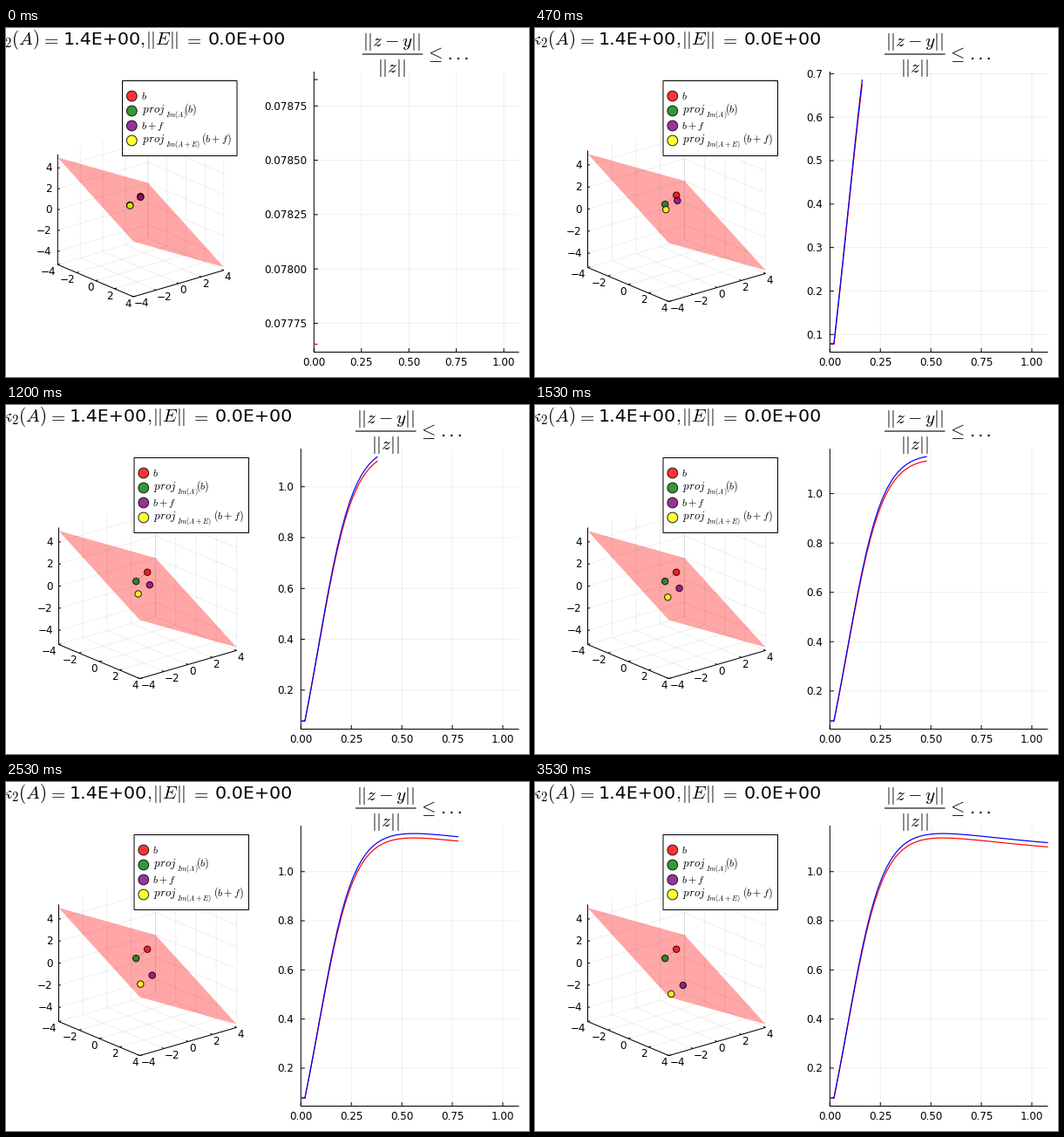
A matplotlib script that plays this animation: 600 by 400 pixels, repeating every 3590 ms.

```python
import math
import numpy as np
import matplotlib.pyplot as plt
from matplotlib.animation import FuncAnimation
from matplotlib.patches import Circle, Polygon, Rectangle

W, H, DPI = 600, 400, 100
LOOP_MS, TICKS = 3590, 180
# Fifteen steps a second, each start rounded to 10 ms.
STARTS = 10 * np.round(np.arange(54) * 20 / 3)
PX = 72 / DPI  # points per pixel
SMALL, BIG, NUMBER = 12, 21, 20.5
TOP, BOTTOM, RIGHT = 50, 371.5, 588.5
X_MAX = 1.08
STEPS = [(0.2, 1), (0.1, 1), (0.05, 2), (0.02, 2), (0.00025, 5)]
RED, GREEN, PURPLE, YELLOW = "#ff0000", "#008000", "#800080", "#ffff00"

plt.rcParams["font.family"] = "DejaVu Sans"
plt.rcParams["mathtext.fontset"] = "cm"

fig = plt.figure(figsize=(W / DPI, H / DPI), dpi=DPI, facecolor="white")
ax = fig.add_axes([0, 0, 1, 1])
shown = {"step": None}


def text(x, y, s, size=SMALL, ha="left"):
    ax.text(x, y, s, fontsize=size * PX, ha=ha, va="baseline", color="black",
            zorder=10)


def label(x, y, s, ha):
    """Tick label centred vertically on y."""
    text(x, y + 4.4, s.replace("-", "\u2212"), SMALL, ha)


def relation(x, y, s):
    """Relation sign centred on x; mathtext pads it on the left."""
    text(x - 2.5, y, s, BIG, "center")


def line(xs, ys, color="black", width=1.0, alpha=1.0, z=3, **style):
    ax.plot(xs, ys, color=color, lw=width * PX, alpha=alpha, zorder=z,
            solid_capstyle="butt", snap=False, **style)


def seg(p, q, **style):
    line([p[0], q[0]], [p[1], q[1]], **style)


def grid(p, q):
    seg(p, q, width=0.9, alpha=0.07, z=1)


def dot(x, y, r, color, z):
    ax.add_patch(Circle((x, y), r, fc=color, ec="none", alpha=0.8, zorder=z))
    ax.add_patch(Circle((x, y), r, fc="none", ec="black", lw=PX,
                        alpha=0.85, zorder=z))


def bound(x):
    return x / np.sqrt(0.06883 - 0.2458 * x + 0.969 * x * x)


def curve(k):
    """Samples up to step k; the first value is held once."""
    x = 0.02 * np.arange(k + 2)
    return x, bound(np.maximum(x, 0.02))


def y_ticks(lo, hi):
    for step, digits in STEPS:
        first, last = math.ceil(lo / step), math.floor(hi / step)
        if last - first >= 3:
            break
    return [i * step for i in range(first, last + 1)], digits


def draw_titles(w):
    s, y = -7.7 * w, 19
    text(46.8 + s, y, r"$\kappa_2(A)$", BIG, "right")
    relation(60.7 + s, y, "$=$")
    text(73 + s, y, "1.4E+00", NUMBER)
    text(161 + s, y, "$,$", BIG)
    text(167.5 + s, y, "$||E||$", BIG)
    relation(225 + s, y, "$=$")
    text(328.4 + s, y, "0.0E+00", NUMBER, "right")

    s = 7.7 * w
    text(435 + s, 21, "$||z-y||$", BIG, "center")
    seg((401 + s, 30), (470.5 + s, 30), width=1.1)
    text(435 + s, 51, "$||z||$", BIG, "center")
    relation(486 + s, 36, r"$\leq$")
    for x in (502, 511.3, 520.6):
        ax.add_patch(Circle((x + s, 35), 1.2, color="black", lw=0))


def draw_legend(w):
    s = -13.5 * w
    ax.add_patch(Rectangle((147 + s, 60.5), 131.5, 86, fc="white", ec="black",
                           lw=PX, zorder=5, snap=False))
    for y, color in zip((78, 95, 112, 129), (RED, GREEN, PURPLE, YELLOW)):
        dot(157.8 + s, y, 5.9, color, 6)
    text(168.3 + s, 82, "$b$")
    text(168.3 + s, 116, "$b+f$")
    for y, sub, arg, x in ((96.5, "Im(A)", "(b)", 218),
                           (130.5, "Im(A+E)", "(b+f)", 237.5)):
        text(169.3 + s, y, "$proj$", 13.2)
        text(196.5 + s, y + 5.3, f"${sub}$", 8.2)
        text(x + s, y, f"${arg}$")


def draw_space(k, w):
    sx, sy = 1 - 0.066 * w, 1 - 0.057 * w

    def place(px, py):
        return 60.5 - 1.2 * w + (px - 60.5) * sx, 207.5 + 0.5 * w + (py - 207.5) * sy

    def project(x, y, z):
        u, v = (x + 4) / 8, (y + 4) / 8
        return place(60.5 + 93 * u + 111 * v,
                     207.5 + 39 * u - 32.2 * v - 12.65 * z)

    zm = 5.3
    for t in (-4, -2, 0, 2, 4):
        grid(project(t, -4, -zm), project(t, 4, -zm))
        grid(project(t, 4, -zm), project(t, 4, zm))
        grid(project(-4, t, -zm), project(4, t, -zm))
        grid(project(-4, t, -zm), project(-4, t, zm))
        grid(project(-4, -4, t), project(-4, 4, t))
        grid(project(-4, 4, t), project(4, 4, t))

        p = project(t, -4, -zm)
        seg(p, project(t, -3.8, -zm))
        label(p[0] - 1.8, p[1] + 7.3, str(t), "right")
        p = project(4, t, -zm)
        seg(p, project(3.8, t, -zm))
        label(p[0] + 0.8, p[1] + 7, str(t), "left")
        p = project(-4, -4, t)
        seg(p, (p[0] + 2.5, p[1]))
        label(p[0] - 6.7, p[1] - 0.4, str(t), "right")

    corners = [(-4, -4, 5), (-4, 4, 0), (4, 4, -5), (4, -4, 0)]
    ax.add_patch(Polygon([project(*c) for c in corners], fc=RED, ec="none",
                         alpha=0.35, zorder=2))
    edge = [project(-4, -4, zm), project(-4, -4, -zm),
            project(4, -4, -zm), project(4, 4, -zm)]
    line(*zip(*edge))

    n = k + 1
    b, proj = (162.2, 191.7), (149.2, 202.1)
    seg(place(*b), place(*proj), alpha=0.4, ls=":")
    points = [(*b, RED), (*proj, GREEN),
              (b[0] + 0.141 * n, b[1] + 0.765 * n, PURPLE),
              (proj[0] + 0.131 * n, proj[1] + 0.757 * n, YELLOW)]
    for i, (x, y, color) in enumerate(points):
        dot(*place(x, y), 3.7, color, 4 + i / 10)


def draw_plot(w, x, blue, red, lo, hi, ticks, digits):
    left = 338.3 + 15 * w

    def to_x(v):
        return left + np.asarray(v) / X_MAX * (RIGHT - left)

    def to_y(v):
        return BOTTOM - (np.asarray(v) - lo) / (hi - lo) * (BOTTOM - TOP)

    for v in (0, 0.25, 0.5, 0.75, 1):
        px = to_x(v)
        grid((px, TOP), (px, BOTTOM))
        seg((px, BOTTOM), (px, BOTTOM - 4.5))
        label(px, 382.8, f"{v:.2f}", "center")
    for v in ticks:
        py = to_y(v)
        grid((left, py), (RIGHT, py))
        seg((left, py), (left + 4.5, py))
        label(left - 8, py, f"{v:.{digits}f}", "right")
    line([left, left, RIGHT], [TOP, BOTTOM, BOTTOM])
    line(to_x(x), to_y(red), color="red", width=1.2, z=4)
    line(to_x(x), to_y(blue), color="blue", width=1.2, z=4.1)


def draw_step(k):
    ax.clear()
    ax.set_xlim(0, W)
    ax.set_ylim(H, 0)
    ax.axis("off")

    x, blue = curve(k)
    red = 0.98456 * blue
    pad = 0.03 * (blue.max() - red.min())
    lo, hi = red.min() - pad, blue.max() + pad
    ticks, digits = y_ticks(lo, hi)
    w = (digits - 1) / 4  # wider tick labels squeeze both panels

    draw_titles(w)
    draw_space(k, w)
    draw_legend(w)
    draw_plot(w, x, blue, red, lo, hi, ticks, digits)


def draw(i):
    """Show the last step that starts before tick i ends."""
    k = int(np.searchsorted(STARTS, (i + 1) * LOOP_MS / TICKS)) - 1
    if k != shown["step"]:
        draw_step(k)
        shown["step"] = k
    return []


def reset():
    shown["step"] = None
    return draw(0)


anim = FuncAnimation(fig, draw, frames=TICKS, init_func=reset,
                     interval=LOOP_MS / TICKS, repeat=True, repeat_delay=0)
plt.show()
```
